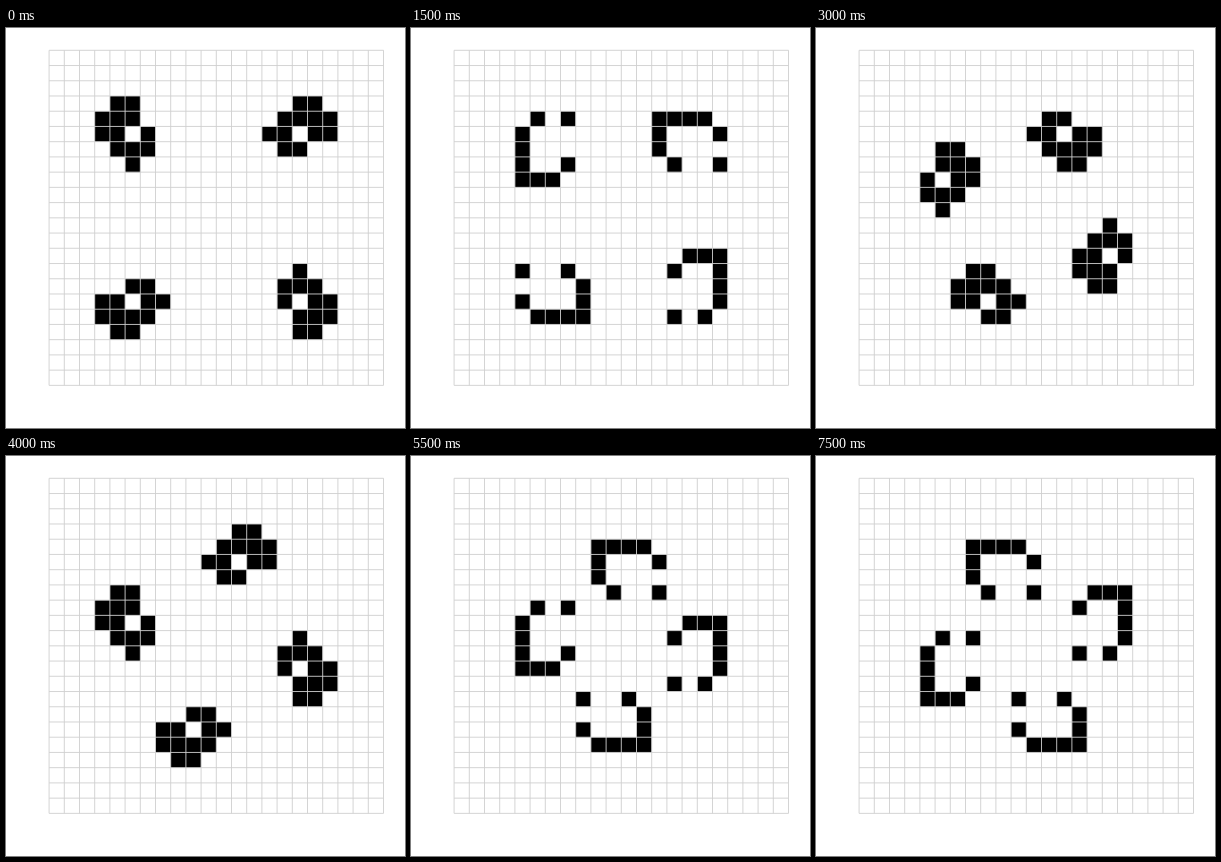
An HTML page with a canvas that plays this animation: 399 px wide and 400 px high, repeating every 8000 ms.

```html
<!DOCTYPE html>
<html lang="en">
<head>
<meta charset="utf-8">
<title>Four spaceships in the Game of Life</title>
<style>
html, body { margin: 0; width: 100%; height: 100%; overflow: hidden; background: #fff; }
canvas { display: block; }
</style>
</head>
<body>
<canvas width="399" height="400"></canvas>
<script>
const N = 22, STEP = 500, GENERATIONS = 16;
const LEFT = 43.1, TOP = 22.3, CELL_W = 15.2, CELL_H = 15.23;
const ctx = document.querySelector('canvas').getContext('2d');
const edgeX = i => LEFT + i * CELL_W;
const edgeY = i => TOP + i * CELL_H;
const emptyGrid = () => Array.from({ length: N }, () => Array(N).fill(0));

// One lightweight spaceship, repeated by quarter turns about the centre.
function firstGeneration() {
  const grid = emptyGrid();
  ['.##.', '###.', '##.#', '.###', '..#.'].forEach((line, j) => {
    [...line].forEach((mark, i) => {
      if (mark !== '#') return;
      let col = i + 3, row = j + 3;
      for (let turn = 0; turn < 4; turn++) {
        grid[row][col] = 1;
        [col, row] = [N - 1 - row, col];
      }
    });
  });
  return grid;
}

function nextGeneration(grid) {
  return grid.map((line, r) => line.map((alive, c) => {
    let sum = -alive;
    for (let dr = -1; dr <= 1; dr++)
      for (let dc = -1; dc <= 1; dc++)
        sum += grid[r + dr]?.[c + dc] || 0;
    return +(sum === 3 || (alive && sum === 2));
  }));
}

const generations = [firstGeneration()];
while (generations.length < GENERATIONS) generations.push(nextGeneration(generations.at(-1)));

function draw(grid) {
  ctx.fillStyle = '#fff';
  ctx.fillRect(0, 0, 399, 400);

  ctx.fillStyle = '#000';
  ctx.beginPath();
  grid.forEach((line, r) => line.forEach((alive, c) => {
    if (alive) ctx.rect(edgeX(c), edgeY(r), CELL_W, CELL_H);
  }));
  ctx.fill();

  // Thin antialiased mesh over the cells.
  ctx.strokeStyle = '#d0d0d0';
  ctx.lineWidth = 0.9;
  ctx.beginPath();
  for (let i = 0; i <= N; i++) {
    ctx.moveTo(edgeX(i), edgeY(0));
    ctx.lineTo(edgeX(i), edgeY(N));
    ctx.moveTo(edgeX(0), edgeY(i));
    ctx.lineTo(edgeX(N), edgeY(i));
  }
  ctx.stroke();
}

const start = performance.now();
function tick() {
  const age = Math.floor((performance.now() - start) / STEP);
  draw(generations[age % GENERATIONS]);
  requestAnimationFrame(tick);
}
tick();
</script>
</body>
</html>
```
